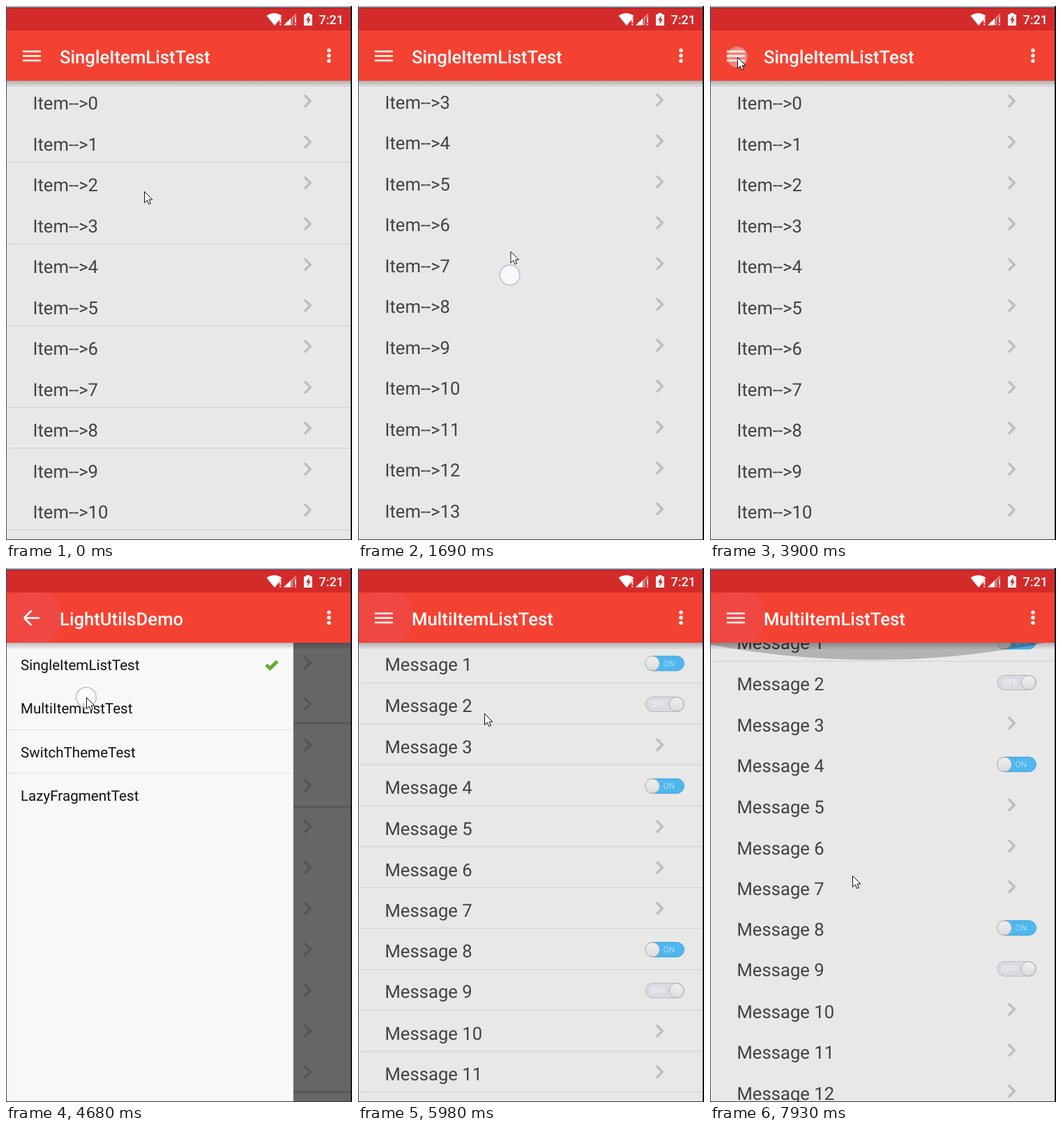
Animation of 496x764 px, one loop 8000 ms. Source, as an HTML page:

```html
<!DOCTYPE html>
<html lang="en">
<head>
<meta charset="utf-8">
<title>List demo</title>
<style>
  html, body { margin: 0; width: 100%; height: 100%; overflow: hidden; background: #e8e8e8; }
  svg { display: block; width: 496px; height: 764px; }
  text { font-family: Roboto, "Open Sans", sans-serif; text-rendering: geometricPrecision; }
  .row { font-size: 25.7px; fill: #424242; }
  .chev { fill: none; stroke: #bdbdbd; stroke-width: 3.4; }
  .dim .chev { stroke: #555; }
  .title { font-size: 25.7px; font-weight: 500; fill: #fff; }
  .entry { font-size: 20.6px; fill: #111; }
  .thin { stroke: #d0d0d0; }
  .wide { stroke: #dedede; stroke-width: 3; }
  .switch { font-size: 12px; text-anchor: middle; }
</style>
</head>
<body>
<svg viewBox="0 0 496 764" xmlns="http://www.w3.org/2000/svg">
  <defs>
    <linearGradient id="fall" x1="0" y1="0" x2="0" y2="1">
      <stop offset="0" stop-color="#000" stop-opacity=".24"/>
      <stop offset="1" stop-color="#000" stop-opacity=".03"/>
    </linearGradient>
    <linearGradient id="ball" x1="0" y1="0" x2="0" y2="1">
      <stop offset="0" stop-color="#f0f0f0"/>
      <stop offset="1" stop-color="#dcdcdc"/>
    </linearGradient>
    <clipPath id="bar"><rect x="1" y="35" width="493" height="72"/></clipPath>
  </defs>
  <rect width="496" height="764" fill="#e8e8e8"/>

  <g id="single"></g>
  <g id="multi"></g>
  <path id="glow" fill="#000" opacity=".23"/>

  <rect id="shade" x="1" y="107" width="493" height="657" fill="#000"/>
  <g id="behind" class="dim"></g>
  <g id="drawer">
    <rect x="1" y="107" width="411" height="657" fill="#f8f8f8"/>
    <path d="M1 231.5H412M1 293.5H412" stroke="#e0e0e0"/>
    <path d="M373 138.5l5.5 5 10.5-10" fill="none" stroke="#5cae30" stroke-width="5"/>
  </g>

  <rect x="1" y="107" width="493" height="9" fill="url(#fall)"/>
  <rect y="35" width="496" height="72" fill="#f34232"/>
  <rect y="2" width="496" height="33" fill="#d32a2a"/>
  <circle id="ripple" cx="37" cy="72" r="42" fill="#ee4a4a" opacity=".7" clip-path="url(#bar)"/>
  <path id="icon" fill="none" stroke="#fff" stroke-width="2.6"/>
  <text id="title" class="title" x="77" y="81.5"></text>
  <g fill="#fff">
    <circle cx="463" cy="63.5" r="2.7"/>
    <circle cx="463" cy="71" r="2.7"/>
    <circle cx="463" cy="78.5" r="2.7"/>
    <path d="M373.5 14Q384.5 6.5 395.5 14L392 18.5V20L385 28Z"/>
    <path d="M392.3 17h2v7h-2zm0 8.5h2v2h-2z"/>
    <path d="M398 27.5L416 10V17H412V27.5Z" opacity=".35"/>
    <path d="M398 27.5L408 18V27.5Z"/>
    <path d="M414 17h2v7h-2zm0 8.5h2v2h-2z"/>
    <path d="M427 12h3.5v-2h5v2h3.5v16h-12z"/>
    <path d="M434.5 13.5l-4.5 7h2.5v5.5l4.3-7h-2.3z" fill="#d32a2a"/>
    <text x="448.5" y="26" font-size="18" font-weight="500">7:21</text>
  </g>

  <rect width="496" height="2" fill="#a3b6c6"/>
  <rect y="2" width="496" height="1" fill="#6d3038"/>
  <rect width="1" height="764" fill="#33527a"/>
  <rect y="763" width="496" height="1" fill="#3a3a3c"/>
  <rect x="494" width="2" height="764" fill="#17181b"/>

  <circle id="touch" r="14.3" fill="#fff" stroke="#b9c3de" stroke-width="1.6"/>
  <path id="cursor" d="M.5 .5V16.5L4.3 13L6.7 18.5L9.3 17.3L7 12H12Z" fill="#fff" stroke="#111"/>
</svg>
<script>
const LOOP = 8000, STEP = 130, PITCH = 58.5, TOP = 107, LAG = 42;
const SWAP = 5070;           // the second list replaces the first
const TAPS = [3900, 4680];

// Pointer stops: time, x, y. A stop with a fourth value ends a drag;
// that value is the finger height at which the list sits at its top.
const stops = [
  [0, 198, 265],
  [520, 213, 262],
  [1040, 213, 564, 262],
  [1300, 213, 562],
  [2080, 224, 140, 562],
  [2990, 240, 590, 562],
  [3770, 39, 73],
  [4160, 39, 73],
  [4550, 115, 185],
  [5460, 115, 185],
  [5980, 181, 208],
  [6760, 183, 530],
  [7150, 183, 330, 530],
  [7280, 248, 130],
  [7670, 232, 470, 330],
  [7880, 204, 440, 471]
].map(([time, x, y, anchor]) => ({ time, x, y, anchor }));

const drags = stops
  .map((s, i) => ({ start: i && stops[i - 1].time, end: s.time, anchor: s.anchor }))
  .filter(d => d.anchor);

const $ = id => document.getElementById(id);
const mix = (a, b, f) => a + (b - a) * f;
const clamp = f => Math.max(0, Math.min(1, f));
const ease = f => (f = clamp(f), f * f * (3 - 2 * f));

function pointerAt(t) {
  const i = stops.findIndex(s => s.time > t);
  if (i < 0) return stops[stops.length - 1];
  if (i === 0) return stops[0];
  const a = stops[i - 1], b = stops[i], f = ease((t - a.time) / (b.time - a.time));
  return { x: mix(a.x, b.x, f), y: mix(a.y, b.y, f) };
}

// How far the finger is below the anchor: positive pulls the glow, negative scrolls.
const pull = (d, t) => pointerAt(Math.min(t - LAG, d.end)).y - d.anchor;

function scrollAt(t) {
  const d = drags.filter(d => d.start <= t && (d.start > SWAP) === (t >= SWAP)).pop();
  return d ? Math.max(0, -pull(d, t)) : 0;
}

const glowAt = t => Math.max(0, ...drags.filter(d => d.start <= t)
  .map(d => .35 * pull(d, t) * clamp(1 - (t - d.end) / 520)));

const openAt = t => ease((t - 4030) / 390) - ease((t - 4940) / 600);

const chevron = i => `<path class="chev" d="M428 ${127.5 + PITCH * i}l8.3 8.5-8.3 8.5"/>`;

function toggle(i, on) {
  const y = 136.5 + PITCH * i;
  return `<rect x="412" y="${y - 10.5}" width="55.5" height="21" rx="10.5"
      fill="${on ? "#50b6ee" : "#d9dbe1"}" stroke="${on ? "#48a8de" : "#b4b8c0"}"/>
    <text class="switch" x="${on ? 446 : 430}" y="${y + 4.3}" fill="${on ? "#a6dcf8" : "#f6f6f8"}">${on ? "ON" : "OFF"}</text>
    <circle cx="${on ? 422 : 456.5}" cy="${y}" r="10.3" fill="url(#ball)" stroke="#adb0b5"/>`;
}

function build() {
  const range = n => [...Array(n).keys()];
  const label = (i, text, lift) =>
    `<text class="row" x="38.4" y="${Math.ceil(148 + PITCH * i) - lift}">${text}</text>`;
  const rule = (i, name) => `<path class="${name}" d="M1 ${Math.floor(164.5 + PITCH * i) + .5}H494"/>`;

  // Hairlines stay sharp on some rows and blur on the others.
  const sharp = i => (i < 8) === (i % 2 === 1);
  const rows = range(11).slice(1);
  const thin = rows.filter(sharp).map(i => rule(i, "thin")).join("");
  const wide = rows.filter(i => !sharp(i)).map(i => rule(i, "wide")).join("");

  $("single").innerHTML = `<g id="singleRules">${thin}</g>` +
    range(20).map(i => label(i, `Item--&gt;${i}`, 0) + chevron(i)).join("");

  const kinds = "10>1>>>10";
  $("multi").innerHTML = `<g id="multiRules">${thin}${wide}</g>${rule(0, "thin")}` +
    range(17).map(i => {
      const plain = (kinds[i] || ">") === ">";
      return label(i, `Message ${i + 1}`, plain ? 0 : 1.4) +
        (plain ? chevron(i) : toggle(i, kinds[i] === "1"));
    }).join("");

  $("behind").innerHTML = range(11).map(chevron).join("") +
    `<path d="M1 222H494M1 342H494M1 750H494" stroke="#575757" stroke-width="3"/>`;

  $("drawer").innerHTML += ["SingleItemListTest", "MultiItemListTest", "SwitchThemeTest", "LazyFragmentTest"]
    .map((s, i) => `<text class="entry" x="21" y="${146 + 62.3 * i}">${s}</text>`).join("");
}

const show = (id, on) => $(id).setAttribute("visibility", on ? "visible" : "hidden");
const move = (id, x, y) => $(id).setAttribute("transform", `translate(${x} ${y})`);

function drawGlow(depth) {
  const cx = 234, k = .00035 + depth * 2.1e-6, low = TOP + depth;
  const left = low - k * cx ** 2, right = low - k * (494 - cx) ** 2;
  $("glow").setAttribute("d",
    `M0 0V${left}Q247 ${left + 494 * k * cx} 494 ${right}V0Z`);
  show("glow", depth > 0);
}

// Three bars turn into a back arrow.
function drawIcon(p) {
  const y = 71.5, x1 = mix(24, 37.5, p), x2 = mix(50, 48, p);
  const out = mix(6.5, 10.5, p), end = mix(6.5, 0, p);
  $("icon").setAttribute("d",
    `M${x1} ${y - out}L${x2} ${y - end}M${mix(24, 26, p)} ${y}H${mix(50, 47, p)}M${x1} ${y + out}L${x2} ${y + end}`);
  $("icon").setAttribute("transform", `rotate(${180 * p} 37 ${y})`);
}

function draw(time) {
  const t = Math.floor(time / STEP) * STEP;
  const second = t >= SWAP, p = openAt(t), offset = scrollAt(t);

  $("single").style.display = second ? "none" : "";
  $("multi").style.display = second ? "" : "none";
  move("single", 0, -offset);
  move("multi", 0, -offset);
  show("singleRules", t < 1300);
  show("multiRules", t < 6890);
  drawGlow(glowAt(t));

  $("shade").setAttribute("opacity", .56 * p);
  $("behind").setAttribute("opacity", second ? 0 : p);
  move("drawer", -412 * (1 - p), 0);
  show("drawer", p > 0);
  show("ripple", t > TAPS[0]);
  drawIcon(p);
  $("title").textContent = p > .5 ? "LightUtilsDemo" : second ? "MultiItemListTest" : "SingleItemListTest";

  const tip = pointerAt(t), finger = pointerAt(t - LAG), faint = finger.y < TOP;
  move("cursor", tip.x, tip.y);
  move("touch", finger.x, finger.y);
  $("touch").setAttribute("fill-opacity", faint ? .35 : .72);
  $("touch").setAttribute("stroke-opacity", faint ? .3 : 1);
  show("touch", TAPS.some(s => t >= s && t < s + 2 * STEP) || drags.some(d => t >= d.start && t <= d.end));
}

build();
const start = performance.now();
function tick() {
  draw((performance.now() - start) % LOOP);
  requestAnimationFrame(tick);
}
tick();
</script>
</body>
</html>
```
